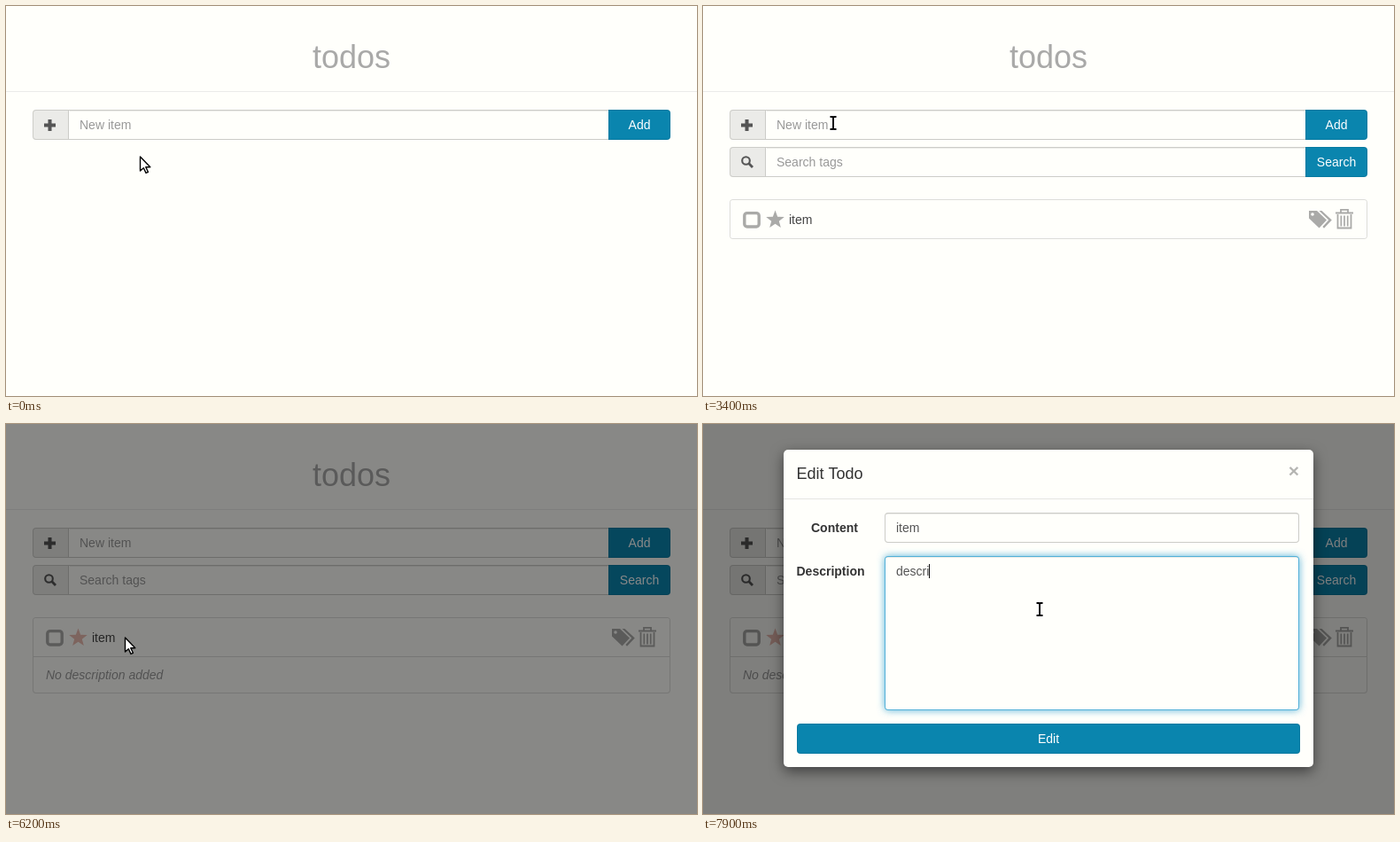
Write an HTML page with a canvas that moves like this. It is 780 px wide and 440 px high and loops after 8000 ms.

```html
<!DOCTYPE html>
<html lang="en">
<head>
<meta charset="utf-8">
<title>todos</title>
<style>
  html, body { margin: 0; width: 100%; height: 100%; overflow: hidden; background: #fffffb; }
  canvas { display: block; }
</style>
</head>
<body>
<canvas id="stage" width="780" height="440"></canvas>
<script>
const ctx = document.getElementById('stage').getContext('2d');
const LOOP = 8000, TICK = 100;
const PAPER = '#fffffb', BLUE = '#0a85ae', BLUE_EDGE = '#0779a0', GREY = '#aaaaa8';
const FOCUS = [82, 176, 216], LINE = [204, 204, 200];
const FONT = '"Liberation Sans", Arial, sans-serif';

// Pointer stops: time, x, y
const POINTER = [
  [0, 151, 170], [700, 151, 170], [1300, 152, 124], [3300, 152, 124],
  [3900, 85, 237], [4600, 85, 237], [5000, 110, 243], [5200, 110, 243],
  [5700, 134, 241], [6400, 134, 241], [6800, 380, 209], [LOOP, 380, 209]
];
const ITEM_KEYS = [1900, 2000, 2100, 2300];
const DESC_KEYS = [7300, 7400, 7600, 7700, 7800, 7900];

const ramp = (t, from, length) => Math.min(1, Math.max(0, (t - from) / length));
const smooth = p => p * p * (3 - 2 * p);
const mix = (a, b, p) => a + (b - a) * p;
const blend = (a, b, p) => `rgb(${a.map((v, i) => Math.round(mix(v, b[i], p)))})`;
const typed = (word, keys, t) => word.slice(0, keys.filter(k => k <= t).length);

// cubic-bezier(0, 0, .58, 1)
function easeOut(x) {
  let lo = 0, hi = 1;
  for (let i = 0; i < 24; i++) {
    const s = (lo + hi) / 2;
    if (3 * (1 - s) * s * s * 0.58 + s ** 3 < x) lo = s; else hi = s;
  }
  return 3 * (1 - lo) * lo * lo + lo ** 3;
}

function text(str, x, y, color, { size = 14, style = '', align = 'left' } = {}) {
  ctx.font = `${style} ${size}px ${FONT}`;
  ctx.textAlign = align;
  ctx.fillStyle = color;
  ctx.fillText(str, x, y);
}

function box(x, y, w, h, radius, fill, edge) {
  ctx.beginPath();
  ctx.roundRect(x, y, w, h, radius);
  ctx.fillStyle = edge;
  ctx.fill();
  ctx.beginPath();
  ctx.roundRect(x + 1, y + 1, w - 2, h - 2, [].concat(radius).map(r => Math.max(0, r - 1)));
  ctx.fillStyle = fill;
  ctx.fill();
}

function rect(x, y, w, h, color) {
  ctx.fillStyle = color;
  ctx.fillRect(x, y, w, h);
}

function poly(points, color) {
  ctx.beginPath();
  points.forEach(([x, y]) => ctx.lineTo(x, y));
  ctx.closePath();
  ctx.fillStyle = color;
  ctx.fill();
}

function stroke(path, color, width) {
  ctx.strokeStyle = color;
  ctx.lineWidth = width;
  ctx.stroke(new Path2D(path));
}

function field(x, y, w, h, radius, focus, value, hint, caret) {
  if (focus > 0) {
    ctx.save();
    ctx.shadowBlur = 8;
    ctx.shadowColor = `rgba(${FOCUS},${0.6 * focus})`;
    box(x, y, w, h, radius, PAPER, PAPER);
    ctx.restore();
  }
  box(x, y, w, h, radius, PAPER, blend(LINE, FOCUS, focus));
  rect(x + 2, y + 1, w - 4, 1, 'rgba(0,0,0,.075)');
  text(value || hint, x + 13, y + 22, value ? '#555' : '#999');
  if (caret) rect(Math.floor(x + 13 + (value ? ctx.measureText(value).width : 0)), y + 9, 1, 16, '#111');
}

function button(x, y, w, label, radius) {
  box(x, y, w, 34, radius, BLUE, BLUE_EDGE);
  text(label, x + w / 2, y + 22, '#fff', { align: 'center' });
}

function inputGroup(y, label, hint, focus, value, caret) {
  box(30, y, 41, 34, [4, 0, 0, 4], '#ebebe8', blend(LINE, LINE, 0));
  button(680, y, 70, label, [0, 4, 4, 0]);
  field(70, y, 611, 34, 0, focus, value, hint, caret);
  if (!focus) rect(680, y, 1, 34, BLUE_EDGE);
}

function star(cx, cy, r, color) {
  poly(Array.from({ length: 10 }, (_, i) => {
    const a = i * Math.PI / 5 - Math.PI / 2, d = i % 2 ? r * 0.42 : r;
    return [cx + d * Math.cos(a), cy + d * Math.sin(a)];
  }), color);
}

function pencil(color) {
  poly([[129, 249], [130.5, 243.5], [140, 234], [144, 238], [134.5, 247.5]], color);
  poly([[141.3, 232.7], [143, 231], [147, 235], [145.3, 236.7]], color);
}

function tags(back) {
  poly([[684, 231], [693, 231], [704, 241.5], [695.5, 250.5], [684, 239.5]], GREY);
  poly([[695.5, 231], [698.5, 231], [709.8, 241.4], [701, 250.7], [699.4, 249], [706.3, 241.5]], GREY);
  ctx.beginPath();
  ctx.arc(688, 235, 1.8, 0, 7);
  ctx.fillStyle = back;
  ctx.fill();
}

function trash() {
  stroke('M714 233.5H734M720 233V229.8H728V233M716.5 235V250.5H731.5V235', GREY, 1.8);
  stroke('M720.3 236.5V248.5M724 236.5V248.5M727.7 236.5V248.5', GREY, 1.7);
}

function todo(t, hover) {
  const open = easeOut(ramp(t, 5050, 350));
  const body = Math.round(41 * open);
  const back = hover ? '#f4f4f2' : PAPER;
  box(30, 218, 720, 45 + body, 4, PAPER, '#ddddda');
  ctx.beginPath();
  ctx.roundRect(31, 219, 718, 43, body ? [3, 3, 0, 0] : 3);
  ctx.fillStyle = back;
  ctx.fill();
  if (body) {
    rect(31, 262, 718, 1, '#ddddda');
    ctx.save();
    ctx.beginPath();
    ctx.rect(31, 263, 718, body - 1);
    ctx.clip();
    text('No description added', 45, 288, '#999', { style: 'italic' });
    ctx.restore();
  }

  ctx.beginPath();
  ctx.roundRect(46.8, 233.6, 16.4, 15.4, 3);
  ctx.strokeStyle = GREY;
  ctx.lineWidth = 3.4;
  ctx.stroke();

  const tint = t < 4700 ? [216, 166, 151] : [234, 186, 175];
  star(81.5, 241.3, 10.8, blend([170, 170, 168], tint, ramp(t, 4150, 300)));
  text('item', 97, 246, '#444');
  if (hover) {
    const pressed = t >= 6000;
    if (pressed) {
      ctx.strokeStyle = '#ecbfb5';
      ctx.lineWidth = 1;
      ctx.strokeRect(129.5, 228.5, 18, 22);
    }
    pencil(t >= 5600 ? '#555' : GREY);
  }
  tags(back);
  trash();
}

function modal(t) {
  const fade = ramp(t, 6205, 150);
  if (!fade) return;
  ctx.save();
  ctx.globalAlpha = fade;
  ctx.translate(0, Math.round(-110 * (1 - easeOut(ramp(t, 6206, 300)))));

  ctx.save();
  ctx.shadowColor = 'rgba(0,0,0,.5)';
  ctx.shadowBlur = 15;
  ctx.shadowOffsetY = 5;
  ctx.beginPath();
  ctx.roundRect(91, 29, 598, 358, 5);
  ctx.fillStyle = PAPER;
  ctx.fill();
  ctx.restore();

  text('Edit Todo', 105.5, 62, '#333', { size: 18 });
  text('×', 667, 60, '#b5b5b2', { size: 21, style: 'bold', align: 'center' });
  rect(91, 84, 598, 1, '#e5e5e2');
  text('Content', 122, 122, '#333', { style: 'bold' });
  text('Description', 105.5, 171, '#333', { style: 'bold' });
  field(205, 100, 468, 34, 4, 0, 'item', '', false);
  field(205, 149, 468, 174, 4, ramp(t, 6820, 150), typed('descri', DESC_KEYS, t), 'Description', t >= 6900);
  button(106, 338, 568, 'Edit', 4);
  ctx.restore();
}

function pointerAt(t) {
  const i = POINTER.findIndex((stop, n) => n && t < stop[0]);
  const [t0, x0, y0] = POINTER[i - 1], [t1, x1, y1] = POINTER[i];
  const p = smooth(ramp(t, t0, t1 - t0));
  return [Math.round(mix(x0, x1, p)), Math.round(mix(y0, y1, p))];
}

function pointerShape(t, x, y) {
  if (t >= 6100) {
    const inField = (y > 100 && y < 134) || (y > 149 && y < 323);
    return t > 6400 && x > 205 && x < 673 && inField ? 'beam' : 'arrow';
  }
  if (y >= 117 && y < 151) return 'beam';
  if (t < 2500) return 'arrow';
  if (y >= 159 && y < 193) return 'beam';
  return y >= 218 && y < 263 ? 'hand' : 'arrow';
}

function pointer(shape, x, y) {
  ctx.save();
  ctx.translate(x, y);
  ctx.lineJoin = 'round';
  if (shape === 'beam') {
    const beam = 'M-3.5 -7H-1L0 -6L1 -7H3.5M0 -6V6M-3.5 7H-1L0 6L1 7H3.5';
    stroke(beam, '#fff', 4);
    stroke(beam, '#000', 1.9);
  } else {
    const path = new Path2D(shape === 'hand'
      ? 'M-1.5 9V.8Q0 -1.6 1.6 .8V5.5Q3.6 4.2 4.8 6.2Q6.7 5 7.9 7Q10.6 6.3 11 9V12.5L9 16H.5L-4 10.5Q-4.2 7.3 -1.5 9Z'
      : 'M.5 0V16L4.3 12.7L7 18.4L9.4 17.3L6.8 11.7H11.8Z');
    ctx.fillStyle = '#fff';
    ctx.fill(path);
    ctx.strokeStyle = '#000';
    ctx.lineWidth = 1.4;
    ctx.stroke(path);
    if (shape === 'hand') stroke('M1.6 5.5V9M4.8 6.2V9M7.9 7V9.5', '#000', 1);
  }
  ctx.restore();
}

function draw(t) {
  const [x, y] = pointerAt(t);
  const shape = pointerShape(t, x, y);
  const added = t >= 2500;
  const focus = ramp(t, 1320, 150) * (1 - ramp(t, 2450, 150));

  rect(0, 0, 780, 440, PAPER);
  text('todos', 390, 70, '#a9a9a8', { size: 36, align: 'center' });
  rect(0, 96, 780, 1, '#ebebe9');

  inputGroup(117, 'Add', 'New item', focus, added ? '' : typed('item', ITEM_KEYS, t), t >= 1400 && !added);
  rect(43, 132.5, 13, 4, '#555');
  rect(47.5, 128, 4, 13, '#555');

  if (added) {
    inputGroup(159, 'Search', 'Search tags', 0, '', false);
    ctx.beginPath();
    ctx.arc(48.5, 174.5, 4.3, 0, 7);
    ctx.strokeStyle = '#555';
    ctx.lineWidth = 2.1;
    ctx.stroke();
    stroke('M51.6 177.6L56 182', '#555', 2.8);
    todo(t, shape === 'hand');
  }

  const shade = 0.5 * ramp(t, 6060, 150);
  if (shade) rect(0, 0, 780, 440, `rgba(0,0,0,${shade})`);
  modal(t);
  pointer(shape, x, y);
}

const start = performance.now();
function frame() {
  const t = (performance.now() - start + 1) % LOOP;
  draw(Math.floor(t / TICK) * TICK);
  requestAnimationFrame(frame);
}
frame();
</script>
</body>
</html>
```
